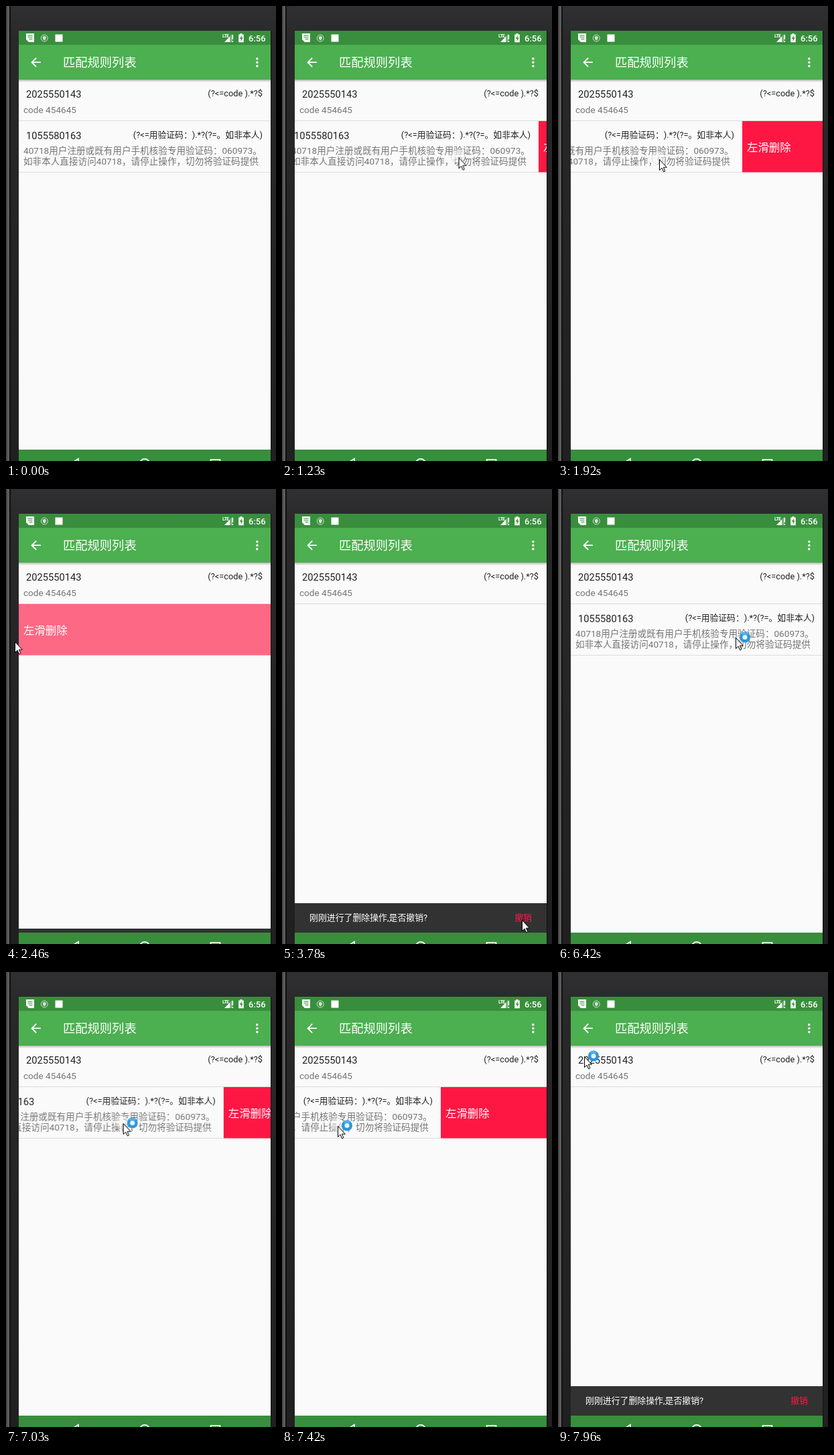
Animation, 403 px wide and 680 px high, one loop 8 s. Source, as an HTML page:

```html
<!DOCTYPE html>
<html lang="zh-CN">
<head>
<meta charset="utf-8">
<title>匹配规则列表</title>
<style>
html, body { margin: 0; width: 100%; height: 100%; overflow: hidden; background: #242424; }
svg { display: block; width: 403px; height: 680px; }
text {
  font-family: Roboto, "Noto Sans CJK SC", "Noto Sans CJK", sans-serif;
  text-spacing-trim: space-all;
  white-space: pre;
}
.end { text-anchor: end; }
.sender { font-size: 14.7px; fill: #212121; }
.rule { font-size: 12.8px; fill: #212121; }
.body { font-size: 13.6px; fill: #757575; }
.label { font-size: 16.4px; fill: #fff; }
.bar { font-size: 12.9px; fill: #fff; }

/* Everything holds between keys; moving stretches use steps() at about 13 per second. */
.anim { animation: 8s step-end infinite; }
#row { animation-name: swipe, fade; }
#snack { animation-name: rise; }
#snackText { animation-name: reveal; }
#cursor { animation-name: point, present; }
#touch { animation-name: press; }
#busy { animation-name: wait; }

@keyframes swipe {
  0% { transform: translateX(0); }
  14.28% { transform: translateX(0); animation-timing-function: steps(10); }
  23.95% { transform: translateX(-120px); animation-timing-function: steps(4); }
  27.81% { transform: translateX(-222px); animation-timing-function: steps(2); }
  29.75% { transform: translateX(-376px); }
  52.95% { transform: translateX(0); }
  83.89% { transform: translateX(0); animation-timing-function: steps(9); }
  92.6% { transform: translateX(-158px); animation-timing-function: steps(2); }
  94.53% { transform: translateX(-290px); }
  95.5%, 100% { transform: translateX(-376px); }
}
@keyframes fade {
  0% { opacity: 1; }
  30.71% { opacity: .64; }
  31.68% { opacity: 0; }
  53.92% { opacity: .3; }
  54.89% { opacity: .8; }
  55.85% { opacity: 1; }
  95.5% { opacity: .64; }
  96.46%, 100% { opacity: 0; }
}
@keyframes rise {
  0% { transform: translateY(44px); }
  30.71% { transform: translateY(38px); }
  31.68% { transform: translateY(16px); }
  32.65% { transform: translateY(4px); }
  33.61% { transform: translateY(0); }
  53.92% { transform: translateY(8px); }
  54.89% { transform: translateY(32px); }
  55.85% { transform: translateY(44px); }
  95.5% { transform: translateY(38px); }
  96.46% { transform: translateY(16px); }
  97.43% { transform: translateY(4px); }
  98.4%, 100% { transform: translateY(0); }
}
@keyframes reveal {
  0% { opacity: 0; }
  31.68% { opacity: .3; }
  32.65% { opacity: .75; }
  33.61% { opacity: 1; }
  55.85% { opacity: 0; }
  96.46% { opacity: .3; }
  97.43% { opacity: .75; }
  98.4%, 100% { opacity: 1; }
}
@keyframes point {
  0% { transform: translate(312px, 570px); }
  .74% { transform: translate(312px, 570px); animation-timing-function: steps(5); }
  5.57% { transform: translate(113px, 117px); animation-timing-function: steps(5); }
  10.41% { transform: translate(215px, 145px); animation-timing-function: steps(3); }
  13.31% { transform: translate(275px, 222px); }
  14.28% { transform: translate(276px, 226px); animation-timing-function: steps(10); }
  23.95% { transform: translate(151px, 229px); animation-timing-function: steps(5); }
  28.78% { transform: translate(13px, 228px); }
  31.68% { transform: translate(12px, 227px); animation-timing-function: steps(11); }
  42.32% { transform: translate(344px, 640px); animation-timing-function: steps(3); }
  45.22% { transform: translate(357px, 643px); }
  47.15% { transform: translate(358px, 644px); }
  53.92% { transform: translate(358px, 644px); animation-timing-function: steps(5); }
  58.75% { transform: translate(404px, 560px); }
  64.56% { transform: translate(352px, 428px); animation-timing-function: steps(10); }
  74.22% { transform: translate(108px, 129px); }
  75.19% { transform: translate(108px, 129px); animation-timing-function: steps(5); }
  80.03% { transform: translate(265px, 222px); }
  81% { transform: translate(258px, 223px); }
  81.96% { transform: translate(248px, 223px); }
  83.89% { transform: translate(248px, 223px); animation-timing-function: steps(9); }
  92.6% { transform: translate(83px, 230px); animation-timing-function: steps(2); }
  94.53% { transform: translate(24px, 229px); }
  95.5% { transform: translate(4px, 226px); animation-timing-function: steps(4); }
  99.36%, 100% { transform: translate(39px, 126px); }
}
@keyframes present {
  0% { opacity: 0; }
  .74% { opacity: 1; }
  58.75% { opacity: 0; }
  64.56%, 100% { opacity: 1; }
}
@keyframes press {
  0% { opacity: 0; }
  13.31% { opacity: 1; }
  28.78% { opacity: 0; }
  83.89% { opacity: 1; }
  94.53%, 100% { opacity: 0; }
}
@keyframes wait {
  0% { opacity: 0; }
  64.56%, 100% { opacity: 1; }
}
</style>
</head>
<body>
<svg viewBox="0 0 403 680">
  <defs>
    <linearGradient id="shell" x2="0" y2="1">
      <stop stop-color="#303032"/><stop offset=".07" stop-color="#29292a"/><stop offset="1" stop-color="#202020"/>
    </linearGradient>
    <linearGradient id="edge">
      <stop stop-color="#3c3c3c"/><stop offset=".7" stop-color="#646464"/><stop offset="1" stop-color="#4a4a4a"/>
    </linearGradient>
    <linearGradient id="shade" x2="0" y2="1">
      <stop stop-opacity=".28"/><stop offset="1" stop-opacity="0"/>
    </linearGradient>
    <clipPath id="screen"><rect x="19" y="37" width="376" height="643"/></clipPath>
    <clipPath id="dock"><rect x="19" y="619" width="376" height="44"/></clipPath>
  </defs>

  <!-- phone -->
  <rect width="403" height="680" fill="url(#shell)"/>
  <rect width="5" height="680" fill="url(#edge)"/>
  <rect x="5" width="2" height="680" fill="#111"/>
  <rect x="395" y="37" width="1" height="643" fill="#111"/>
  <rect x="19" y="37" width="376" height="643" fill="#fafafa"/>

  <!-- messages -->
  <g clip-path="url(#screen)">
    <text class="sender" x="30" y="136.8">2025550143</text>
    <text class="rule end" x="383" y="135">(?&lt;=code ).*?$</text>
    <text class="body" x="26" y="159.5">code 454645</text>
    <rect x="19" y="171" width="376" height="1" fill="#dcdcdc"/>
    <g id="row" class="anim">
      <text class="sender" x="30" y="198.7">1055580163</text>
      <text class="rule end" x="383" y="197">(?&lt;=用验证码：).*?(?=。如非本人)</text>
      <text class="body" x="26" y="221">40718用户注册或既有用户手机核验专用验证码：060973。</text>
      <text class="body" x="26" y="237">如非本人直接访问40718，请停止操作，切勿将验证码提供</text>
      <rect x="19" y="248" width="376" height="1" fill="#dcdcdc"/>
      <rect x="395" y="172" width="376" height="76.5" fill="#ff1744"/>
      <text class="label" x="402" y="216.5">左滑删除</text>
    </g>
  </g>

  <!-- status bar and toolbar -->
  <rect x="19" y="110" width="376" height="4" fill="url(#shade)"/>
  <rect x="19" y="37" width="376" height="21" fill="#388e3c"/>
  <rect x="19" y="58" width="376" height="52" fill="#4caf50"/>
  <g fill="#fff">
    <path d="M30 41h12v13h-8l-4-4z"/>
    <path d="M32.5 44.5h7M32.5 47h7M34.5 49.5h5" stroke="#388e3c"/>
    <g opacity=".75">
      <circle cx="57.3" cy="48" r="5" fill="none" stroke="#fff"/>
      <path d="M54.8 45.8l2.5-1 2.5 1v2q0 2.4-2.5 3.6q-2.5-1.2-2.5-3.6z"/>
    </g>
    <rect x="73.5" y="42.5" width="11" height="11"/>
    <path d="M338 41.5V54H326z" opacity=".35"/>
    <path d="M334 46v8h-8z"/>
    <text x="323" y="46.5" font-size="7" font-weight="700" textLength="auto" letter-spacing="-.7">LTE</text>
    <path d="M337.5 43h1.6v7h-1.6zM337.5 52h1.6v2h-1.6z"/>
    <path d="M349.5 41h3v1.4h2.3v11.8h-7.6V42.4h2.3z"/>
    <path d="M351.8 44l-3 4.8h1.9v3.7l3-4.9h-1.9z" fill="#388e3c"/>
    <text x="362" y="52.7" font-size="13" font-weight="500">6:56</text>
    <path transform="translate(33.6 73.2) scale(.914)" d="M20 11H7.83l5.59-5.59L12 4l-8 8 8 8 1.41-1.41L7.83 13H20z"/>
    <text x="85" y="91" font-size="18.3">匹配规则列表</text>
    <circle cx="374.8" cy="78.7" r="1.8"/>
    <circle cx="374.8" cy="84.2" r="1.8"/>
    <circle cx="374.8" cy="89.7" r="1.8"/>
  </g>

  <!-- snackbar -->
  <g clip-path="url(#dock)">
    <g id="snack" class="anim">
      <rect x="19" y="619" width="376" height="44" fill="#323232"/>
      <g id="snackText" class="anim">
        <text class="bar" x="41" y="645.3">刚刚进行了删除操作,是否撤销?</text>
        <text class="bar end" x="373" y="645.3" style="fill:#ff1744">撤销</text>
      </g>
    </g>
  </g>

  <!-- navigation bar -->
  <rect x="19" y="663" width="376" height="17" fill="#388e3c"/>
  <g fill="none" stroke="#fff" stroke-width="1.7">
    <path d="M108 676.5v15l-11.5-7.5z"/>
    <circle cx="207" cy="684.5" r="7.6"/>
    <rect x="305.5" y="678" width="14" height="14"/>
  </g>

  <!-- pointer -->
  <g id="cursor" class="anim">
    <circle id="touch" class="anim" cx="-1" cy="-2" r="10" fill="#fafafa" fill-opacity=".5" stroke="#bbb" stroke-opacity=".6"/>
    <path d="M.5.5v16l3.6-3.4 2.5 5.7 2.3-1-2.5-5.6h4.9z" fill="#fff" stroke="#000"/>
    <g id="busy" class="anim" fill="none">
      <circle cx="14" cy="-.5" r="5.8" fill="#e6f4fc" stroke="#2c96dc" stroke-width="4.4"/>
      <path d="M9.9-4.6a5.8 5.8 0 0 1 8.2 0" stroke="#57b4ea" stroke-width="3"/>
    </g>
  </g>
</svg>
</body>
</html>
```
